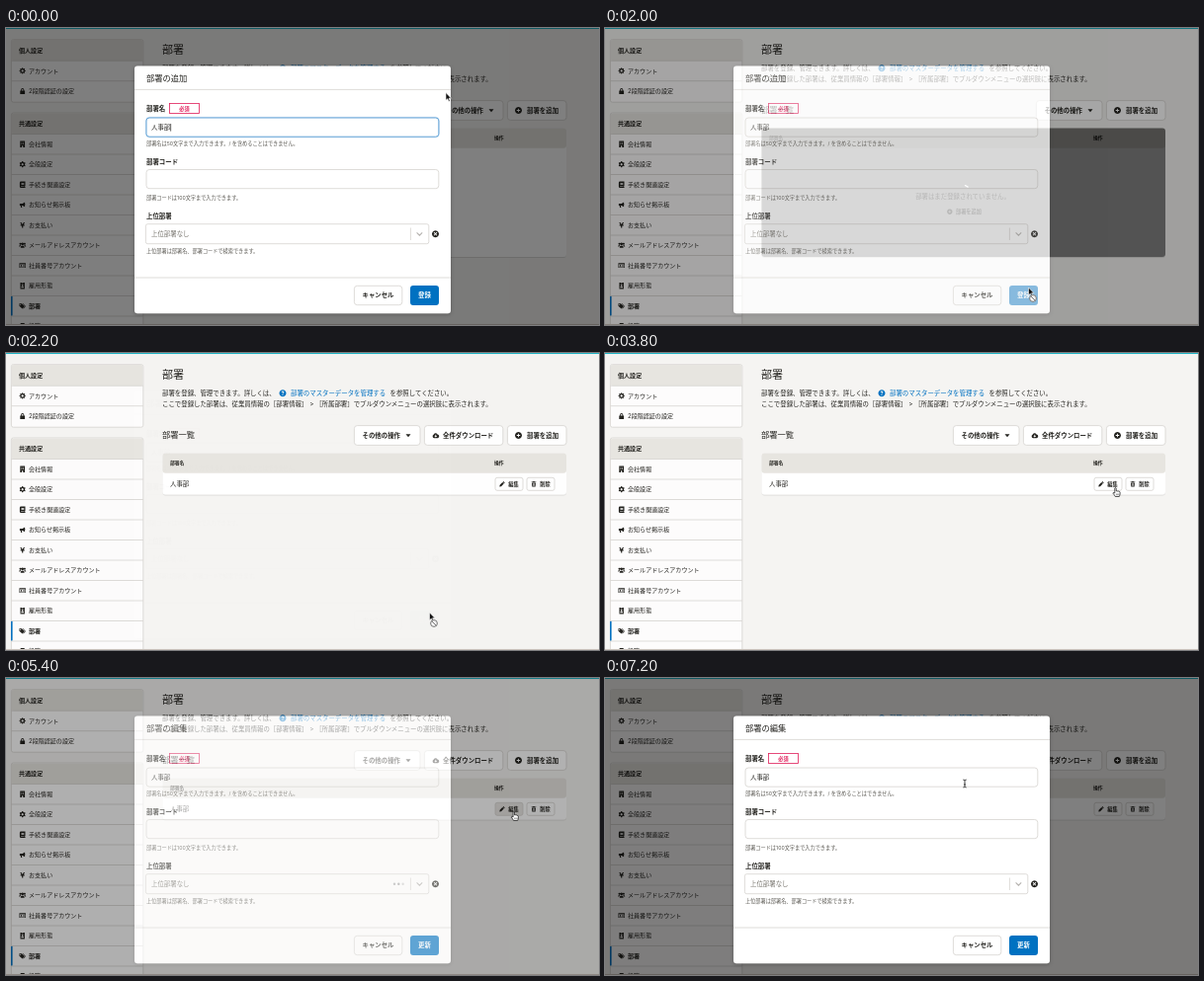
Recreate the animation shown at these times as an HTML page. Size 600 by 301 pixels, loop 8 s.

```html
<!DOCTYPE html>
<html lang="ja">
<head>
<meta charset="utf-8">
<title>部署の登録</title>
<style>
html, body { margin: 0; width: 100%; height: 100%; overflow: hidden; background: #f5f4f2; }
svg { display: block; width: 100vw; height: 100vh; }
text { font-family: Inter, "Noto Sans CJK JP", sans-serif; white-space: pre; }
</style>
</head>
<body>
<svg id="stage" viewBox="0 0 600 301" xmlns="http://www.w3.org/2000/svg"></svg>
<script>
const INK = '#23221e', LINE = '#d6d3d0', BLUE = '#0071c1', RED = '#e01e5a', HEAD = '#e7e5e0';
const BODY = 6.42, SMALL = 5.18, SIDE = 6.05;
const LOOP = 8000;

// y is the vertical middle of the glyphs
const text = (x, y, s, { size = BODY, bold, fill = INK, anchor = 'start', id = '' } = {}) =>
  `<text ${id && `id="${id}"`} x="${x}" y="${y + size * .38}" font-size="${size}" font-weight="${bold ? 700 : 400}" fill="${fill}" text-anchor="${anchor}">${s}</text>`;
const rect = (x, y, w, h, fill, stroke = 'none', r = 0, extra = '') =>
  `<rect x="${x}" y="${y}" width="${w}" height="${h}" rx="${r}" fill="${fill}" stroke="${stroke}" stroke-width=".8" ${extra}/>`;
const line = (x1, y1, x2, y2, color = LINE, w = .8) =>
  `<path d="M${x1} ${y1}L${x2} ${y2}" stroke="${color}" stroke-width="${w}"/>`;
const group = (id, inner, extra = '') => `<g id="${id}" ${extra}>${inner}</g>`;

const cog = teeth => {
  let d = 'M';
  for (let i = 0; i < teeth * 4; i++) {
    const a = (i - .5) * Math.PI / teeth / 2, r = i % 4 < 2 ? 8 : 5.8;
    d += `${8 + r * Math.sin(a)} ${8 - r * Math.cos(a)}L`;
  }
  return d.slice(0, -1) + 'zM8 5.3a2.7 2.7 0 1 0 .01 0z';
};
// 16-unit icon outlines, filled even-odd
const ICONS = {
  gear: cog(8),
  cog: cog(6),
  lock: 'M2 7H4V5a4 4 0 0 1 8 0V7H14V16H2zM6 7H10V5a2 2 0 0 0-4 0z',
  building: 'M2 0H14V16H9.5V12H6.5V16H2zM5 3V5H7V3zM9 3V5H11V3zM5 7V9H7V7zM9 7V9H11V7z',
  book: 'M4 0H15V12H14V14H15V16H4Q1 16 1 13V3Q1 0 4 0zM5 4V5.5H12V4zM5 7V8.5H12V7zM4 12.5V14H12.5V12.5z',
  horn: 'M14 1V13L8 10H6L7 15H4L3 10H1V5H8zM15 5Q17 7 15 9z',
  yen: 'M2 1H5L8 6.5 11 1H14L10.8 7H13V8.5H9.5V10H13V11.5H9.5V15H6.5V11.5H3V10H6.5V8.5H3V7H5.2z',
  users: 'M8 1a3.300 3.300 0 1 0 .01 0zM2.500 2a2.300 2.300 0 1 0 .01 0zM13.500 2a2.300 2.300 0 1 0 .01 0zM3 14.500Q3 8.500 8 8.500T13 14.500zM-1 11.500Q-1 7.500 2.500 7.500L4 8Q2.500 9.500 2.300 11.500zM17 11.500Q17 7.500 13.500 7.500L12 8Q13.500 9.500 13.700 11.500z',
  card: 'M0 2H16V14H0zM1.500 5V12.500H14.500V5zM5 6a1.500 1.500 0 1 0 .01 0zM2.500 11.500Q2.500 9.300 5 9.300T7.500 11.500zM9 6.500H13.500V7.700H9zM9 9.300H13.500V10.500H9z',
  badge: 'M2.500 0H13.500V16H2.500zM6 1.500V2.700H10V1.500zM8 4.500a2 2 0 1 0 .01 0zM4.500 13Q4.500 9.500 8 9.500T11.500 13z',
  tags: 'M0 2H6L13 9 7.500 15 0 8zM3 4a1.200 1.200 0 1 0 .01 0zM8 2H9.500L16 9 10.500 15 9.500 14 14 9z',
  mark: 'M3 0H13V16L8 12 3 16z',
  pencil: 'M0 16L1 11 9 3 13 7 5 15zM10 2L12 0 16 4 14 6z',
  trash: 'M1 1.500H5.500L6 0H10L10.500 1.500H15V3H1zM2 4H14L13 16H3zM5 6V14H6.200V6zM7.500 6V14H8.700V6zM10 6V14H11.200V6z',
  cloud: 'M4 14A4 4 0 0 1 3 6.500A5 5 0 0 1 12 5.500A4.300 4.300 0 0 1 12.500 14zM7 6V9H4.500L8 12.500 11.500 9H9V6z',
  plus: 'M8 0a8 8 0 1 0 .01 0zM7 4H9V7H12V9H9V12H7V9H4V7H7z',
  cross: 'M8 0a8 8 0 1 0 .01 0zM5.200 3.800L8 6.600 10.800 3.800 12.200 5.200 9.400 8 12.200 10.800 10.800 12.200 8 9.400 5.200 12.200 3.800 10.800 6.600 8 3.800 5.200z',
  help: 'M8 0a8 8 0 1 0 .01 0zM4.800 5.500Q5 3 8 3T11.200 5.800Q11.200 7.500 9 8.700V9.700H7V8Q9 7 9 5.900T6.800 5.700zM7 11H9V13H7z'
};
const icon = (name, cx, cy, size = 6, fill = INK) =>
  `<path transform="translate(${cx - size / 2} ${cy - size / 2}) scale(${size / 16})" d="${ICONS[name]}" fill="${fill}" fill-rule="evenodd"/>`;

function menu(top, title, items, current) {
  const step = 20.5, h = step * (items.length + 1) + 2;
  let out = rect(5.4, top, 133.4, h, '#fdfcfc', LINE, 2) +
    rect(5.8, top + .4, 132.6, 21.2, HEAD, 'none', 2) + text(13, top + 10.8, title, { size: SIDE, bold: true });
  items.forEach(([name, label], i) => {
    const y = top + 31.700 + i * step;
    out += line(5.4, y - 10.2, 138.8, y - 10.2) + icon(name, 16.7, y, 6.4) +
      text(23, y, label, { size: SIDE, bold: label === current });
    if (label === current) out += rect(5, y - 9.8, 1.6, 19.700, BLUE);
  });
  return out;
}

const button = (x, w, inner) => rect(x, 73.6, w, 19.8, '#fff', LINE, 3) + inner;
const moreButton = button(352.4, 66.6,
  text(360.5, 83.5, 'その他の操作', { bold: true }) + `<path d="M404.500 82.300h5l-2.500 3z" fill="${INK}"/>`);
const tableHead = rect(158.400, 101.400, 408.600, 20.300, HEAD, 'none', 3) +
  text(166, 111.500, '部署名', { size: 4.8, bold: true }) + text(494, 111.500, '操作', { size: 4.8, bold: true });
const table = h => rect(158.400, 101.400, 408.600, h, '#fff', 'none', 3, 'filter="url(#soft)"') + tableHead;
const rowButton = (x, name, label, id) =>
  rect(x, 126.300, 28, 13, '#fff', LINE, 2, `id="${id}"`) + icon(name, x + 7, 132.800, 5.4) +
  text(x + 13.300, 132.800, label, { size: SMALL, bold: true });

const page =
  rect(0, 0, 600, 301, '#f5f4f2') +
  menu(11.700, '個人設定', [['gear', 'アカウント'], ['lock', '2段階認証の設定']]) +
  menu(86, '共通設定', [['building', '会社情報'], ['cog', '全般設定'], ['book', '手続き関連設定'],
    ['horn', 'お知らせ掲示板'], ['yen', 'お支払い'], ['users', 'メールアドレスアカウント'],
    ['card', '社員番号アカウント'], ['badge', '雇用形態'], ['tags', '部署'], ['mark', '役職']], '部署') +
  text(158, 21.500, '部署', { size: 11 }) +
  text(158, 41, '部署を登録、管理できます。詳しくは、') + icon('help', 280, 40.800, 7, BLUE) +
  text(288, 41, '部署のマスターデータを管理する', { fill: BLUE }) + text(388.500, 41, 'を参照してください。') +
  text(158, 51.800, 'ここで登録した部署は、従業員情報の［部署情報］ &gt; ［所属部署］でプルダウンメニューの選択肢に表示されます。') +
  text(158, 82.500, '部署一覧', { size: 8.25 }) +
  button(507.400, 59.600, icon('plus', 518.500, 83.500, 7) + text(527, 83.500, '部署を追加', { bold: true })) +
  group('empty',
    `<g transform="translate(84 0)">${moreButton}</g>` + table(130.600) +
    text(362, 170.500, '部署はまだ登録されていません。', { anchor: 'middle' }) +
    icon('plus', 348.800, 186.200, 5.400) + text(355, 186.200, '部署を追加', { size: SMALL, bold: true }) +
    group('busy', rect(158.400, 101.400, 408.600, 130.600, 'rgba(0,0,0,.5)', 'none', 3) +
      '<path id="spin" d="M364.500 159.600A7 7 0 0 1 367 161" fill="none" stroke="#fff" stroke-width="1.400" stroke-linecap="round"/>')) +
  group('filled',
    moreButton +
    button(423.400, 79.400, icon('cloud', 434.800, 83.500, 7) + text(442, 83.500, '全件ダウンロード', { bold: true })) +
    table(42.200) + text(166, 132.800, '人事部') +
    rowButton(495, 'pencil', '編集', 'edit') + rowButton(527, 'trash', '削除', 'remove')) +
  rect(0, 0, 600, 1, '#22b6c8') + rect(0, 300, 600, 1, '#cdc5be');

const label = (y, s) => text(142, y, s, { bold: true });
const hint = (y, s) => text(142, y, s, { size: SMALL, fill: '#5a5852' });
const dialog =
  rect(0, 0, 600, 301, 'rgba(0,0,0,.5)') +
  rect(130, 38.600, 320, 250.600, '#fff', 'none', 3, 'filter="url(#deep)"') +
  text(142, 50.800, '', { size: 8.25, id: 'title' }) +
  line(130, 62.400, 450, 62.400) + line(130, 253, 450, 253) +
  label(81.500, '部署名') + rect(165.500, 76.500, 30, 10, '#fff', RED) +
  text(180.500, 81.600, '必須', { size: SMALL, bold: true, fill: RED, anchor: 'middle' }) +
  rect(141.400, 90.400, 297, 20.400, 'none', '#c4dcf1', 3.500, 'id="ring"') +
  rect(142, 91, 295.800, 19.200, '#fff', LINE, 3, 'id="name"') + text(147, 100.700, '人事部') +
  rect(166.400, 97, .7, 7.600, INK, 'none', 0, 'id="caret"') +
  hint(117.500, '部署名は50文字まで入力できます。/ を含めることはできません。') +
  label(135.500, '部署コード') + rect(142, 143.500, 295.800, 19.200, '#fff', LINE, 3) +
  hint(172.500, '部署コードは100文字まで入力できます。') +
  label(190.500, '上位部署') + rect(141.400, 198.700, 286.400, 20, '#fff', LINE, 2) +
  text(147, 208.700, '上位部署なし', { fill: '#77746d' }) + line(409.400, 202.500, 409.400, 215) +
  '<path d="M415.600 207.400l2.800 2.800 2.800-2.800" fill="none" stroke="#b5b2ae" stroke-width="1.100"/>' +
  [393, 397.300, 401.600].map((x, i) => `<circle id="dot${i}" cx="${x}" cy="208.800" r="1.200" fill="#999"/>`).join('') +
  icon('cross', 434.500, 208.700, 7) +
  hint(226, '上位部署は部署名、部署コードで検索できます。') +
  rect(352.400, 261.300, 48.400, 19.400, '#fff', LINE, 3) + text(376.500, 271, 'キャンセル', { bold: true, anchor: 'middle' }) +
  group('submit', rect(409, 261, 29, 20, BLUE, 'none', 3, 'id="submitBox"') +
    text(423.500, 271, '', { bold: true, fill: '#fff', anchor: 'middle', id: 'submitText' }));

const BEAM = 'M-1.700-3.900Q0-3.900 0-3Q0-3.900 1.700-3.900M0-3V3M-1.700 3.900Q0 3.900 0 3Q0 3.900 1.700 3.900M-.900 1H.900';
const stroke = (d, color, w) => `<path d="${d}" fill="none" stroke="${color}" stroke-width="${w}"/>`;
const cursors =
  group('arrow', '<path d="M0 0V7.800L1.800 6.200 3 9 4.300 8.400 3.100 5.700H5.500z" fill="#111" stroke="#fff" stroke-width=".6"/>') +
  group('ban', '<circle cx="4.500" cy="11" r="3.400" fill="#f4f4f4" stroke="#777" stroke-width="1"/>' +
    stroke('M2.200 8.700l4.600 4.600', '#777', 1)) +
  group('hand', '<path d="M-.700 .500Q0-.500 .700 .500V3.400Q1.600 2.800 2.100 3.600 3 3.100 3.400 3.900 4.400 3.600 4.600 4.600V6.400Q4.500 7.600 3.800 9H-.200Q-.700 7.700-2.600 5.600-2.600 4.300-.700 5.500z" fill="#fff" stroke="#111" stroke-width=".7"/>' +
    stroke('M.900 6v1.800M2.100 6v1.800M3.300 6v1.800', '#111', .4)) +
  group('beam', stroke(BEAM, '#fff', 1.700) + stroke(BEAM, '#111', .8));

const stage = document.getElementById('stage');
stage.innerHTML =
  '<defs><filter id="soft" x="-5%" y="-20%" width="110%" height="140%"><feDropShadow dx="0" dy=".6" stdDeviation=".7" flood-opacity=".18"/></filter>' +
  '<filter id="deep" x="-10%" y="-10%" width="120%" height="120%"><feDropShadow dx="0" dy="1" stdDeviation="2" flood-opacity=".25"/></filter></defs>' +
  page + group('dialog', dialog) + group('cursor', cursors);

const el = {};
stage.querySelectorAll('[id]').forEach(n => el[n.id] = n);
const show = (id, on) => el[id].setAttribute('visibility', on ? 'inherit' : 'hidden');
const set = (id, key, v) => el[id].setAttribute(key, v);
const within = (t, a, b) => t >= a && t < b;
const progress = (t, a, b) => Math.min(1, Math.max(0, (t - a) / (b - a)));

// CSS "ease" curve
function ease(x) {
  let lo = 0, hi = 1, u = x;
  for (let i = 0; i < 18; i++) {
    u = (lo + hi) / 2;
    const bx = .75 * u * (1 - u) + u ** 3;
    if (bx < x) lo = u; else hi = u;
  }
  return .3 * u * (1 - u) ** 2 + 3 * u * u * (1 - u) + u ** 3;
}
const smooth = x => x * x * (3 - 2 * x);

// start, end, x, y of each pointer move
const MOVES = [[250, 1100, 425, 266], [1150, 1400, 428.500, 263], [3050, 3800, 516.500, 136.500],
  [3950, 4200, 513.800, 135.500], [5850, 6500, 364, 107]];
function pointer(t) {
  let x = 445, y = 65.500;
  for (const [a, b, tx, ty] of MOVES) {
    const k = smooth(progress(t, a, b));
    x += (tx - x) * k;
    y += (ty - y) * k;
  }
  return [x, y];
}

function draw(t) {
  const adding = t < 2400, saved = t >= 2090, sending = within(t, 1750, 2400);
  const [x, y] = pointer(t);

  show('empty', !saved);
  show('filled', saved);
  show('busy', !saved && t >= 1880);
  set('spin', 'transform', `rotate(${(t - 2000) * .36} 362 166)`);
  set('edit', 'fill', within(t, 3900, 5900) ? '#e9e7e4' : '#fff');

  const fade = adding ? 1 - ease(progress(t, 1940, 2240)) : ease(progress(t, 5260, 5660));
  set('dialog', 'opacity', fade);
  show('dialog', fade > 0);
  el.title.textContent = adding ? '部署の追加' : '部署の編集';
  el.submitText.textContent = adding ? '登録' : '更新';

  const focused = t < 1700;
  show('ring', focused);
  set('name', 'stroke', focused ? '#3f8fcd' : LINE);
  show('caret', t < 300 || within(t, 800, 1300));

  const onSubmit = adding && y > 260;
  set('submit', 'opacity', sending ? .65 : 1);
  set('submitBox', 'fill', onSubmit && !sending ? '#0067b0' : BLUE);
  for (let i = 0; i < 3; i++) {
    const p = (t - 5100) / 1000 + .16 * i;
    set('dot' + i, 'opacity', within(t, 5200, 5750) ? Math.max(0, 1 - Math.abs(p - .4) / .4) : 0);
  }

  const hand = onSubmit && t < 1750 || within(t, 3500, 5900) && y < 140;
  const beam = t > 5900 && x < 438 && y < 111;
  set('cursor', 'transform', `translate(${x} ${y})`);
  show('hand', hand);
  show('beam', beam);
  show('arrow', !hand && !beam);
  show('ban', within(t, 1750, 3100));
}

const begin = performance.now();
function tick() {
  draw((performance.now() - begin) % LOOP);
  requestAnimationFrame(tick);
}
tick();
</script>
</body>
</html>
```
